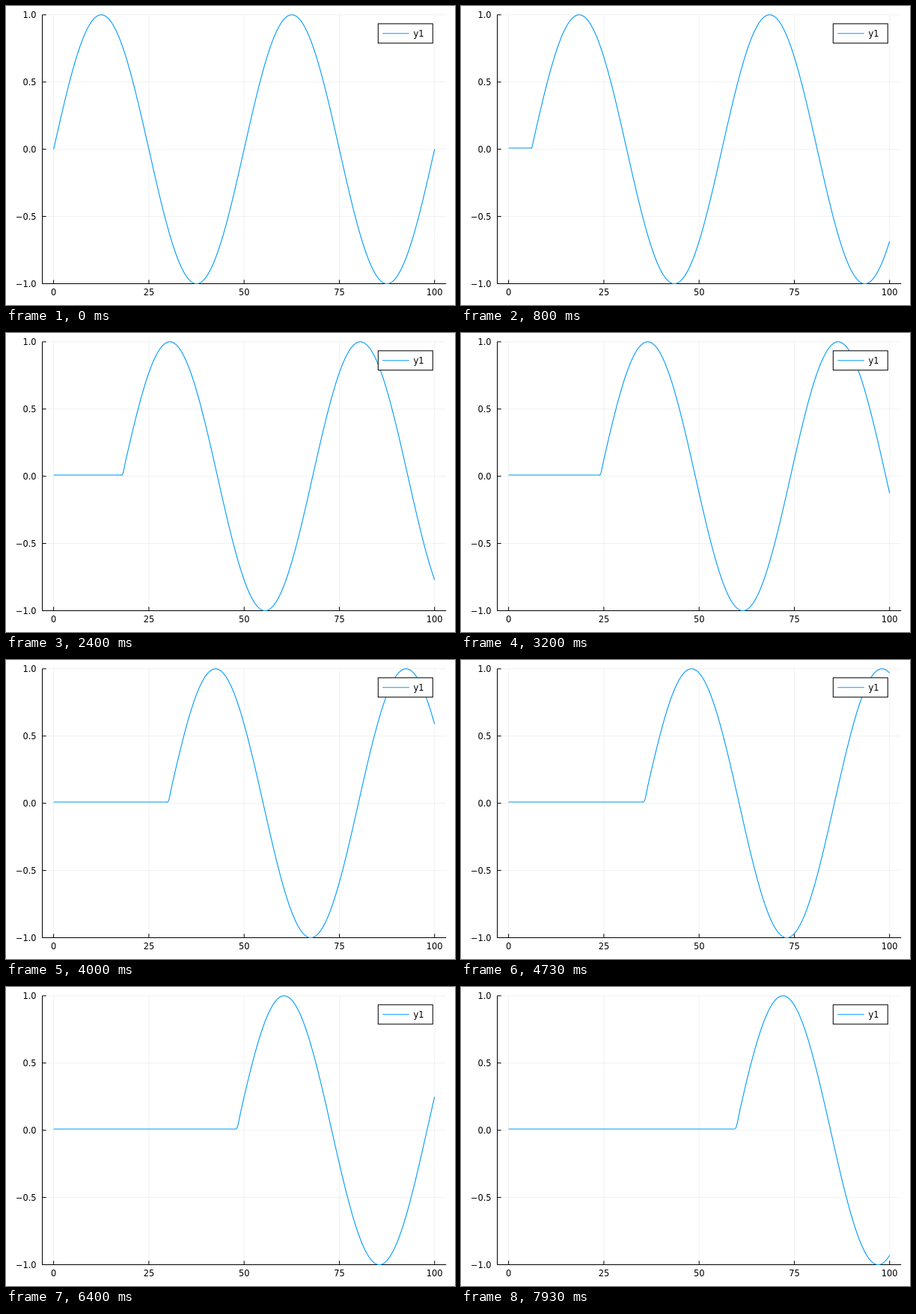
These frames come from a looping animation (600x400 px, 8000 ms). An HTML page:

```html
<!DOCTYPE html>
<html lang="en">
<head>
<meta charset="utf-8">
<title>Travelling sine wave</title>
<style>
  html, body { margin: 0; width: 100%; height: 100%; overflow: hidden; background: #fff; }
  svg { display: block; }
  text { font: 11.4px "DejaVu Sans", sans-serif; fill: #000; }
  .grid { stroke: #000; stroke-opacity: .1; stroke-width: .6; }
  .axis { stroke: #000; stroke-width: 1; fill: none; }
  .wave { stroke: #009afa; stroke-width: 1.1; fill: none; stroke-linejoin: round; }
</style>
</head>
<body>
<svg width="600" height="400" viewBox="0 0 600 400">
  <g id="axes"></g>
  <path id="curve" class="wave"/>
  <rect x="497.3" y="23.8" width="73" height="25.9" fill="#fff" stroke="#000"/>
  <path class="wave" d="M503.2 36.8H538.8"/>
  <text x="544.6" y="41">y1</text>
</svg>
<script>
const LOOP = 8000, FPS = 15, SHIFT_PER_STEP = 0.5;
const WAVE_NUMBER = 2 * Math.PI / 50, INFLOW = 0.009;
const LEFT = 48.5, RIGHT = 588.2, TOP = 11.8, BOTTOM = 371.5;

const px = x => 63.64 + x * 5.091;
const py = y => (TOP + BOTTOM) / 2 - y * (BOTTOM - TOP) / 2;

const line = (style, x1, y1, x2, y2) =>
  `<path class="${style}" d="M${x1} ${y1}L${x2} ${y2}"/>`;
const label = (x, y, anchor, text) =>
  `<text x="${x}" y="${y}" text-anchor="${anchor}">${text}</text>`;

function drawAxes() {
  let grid = '', marks = '';
  for (let x = 0; x <= 100; x += 25) {
    grid += line('grid', px(x), TOP, px(x), BOTTOM);
    marks += line('axis', px(x), BOTTOM, px(x), BOTTOM - 5.2) +
      label(px(x), 387.4, 'middle', x);
  }
  for (let y = -1; y <= 1; y += 0.5) {
    grid += line('grid', LEFT, py(y), RIGHT, py(y));
    marks += line('axis', LEFT, py(y), LEFT + 5.2, py(y)) +
      label(40.6, py(y) + 4.2, 'end', y.toFixed(1).replace('-', '\u2212'));
  }
  const frame = `<path class="axis" d="M${LEFT} ${TOP}V${BOTTOM}H${RIGHT}"/>`;
  document.getElementById('axes').innerHTML = grid + frame + marks;
}

// The wave moves right behind a flat inflow; its corner blurs as it travels.
function height(x, shift) {
  const z = x - shift;
  if (!shift) return Math.sin(WAVE_NUMBER * z);
  const blur = 0.033 * Math.sqrt(shift), u = z / blur;
  const distance = u > 30 ? z : blur * Math.log1p(Math.exp(u));
  const blend = 1 / (1 + Math.exp(1 - u));
  return INFLOW + blend * (Math.sin(WAVE_NUMBER * distance) - INFLOW);
}

const curve = document.getElementById('curve');
let shown = -1;

function render() {
  // A few ms of slack absorb the rounding of step times.
  const step = Math.floor(((performance.now() + 4) % LOOP) * FPS / 1000);
  if (step !== shown) {
    shown = step;
    const points = Array.from({ length: 1001 }, (_, i) =>
      px(i / 10).toFixed(2) + ' ' + py(height(i / 10, step * SHIFT_PER_STEP)).toFixed(2));
    curve.setAttribute('d', 'M' + points.join('L'));
  }
  requestAnimationFrame(render);
}

drawAxes();
render();
</script>
</body>
</html>
```
